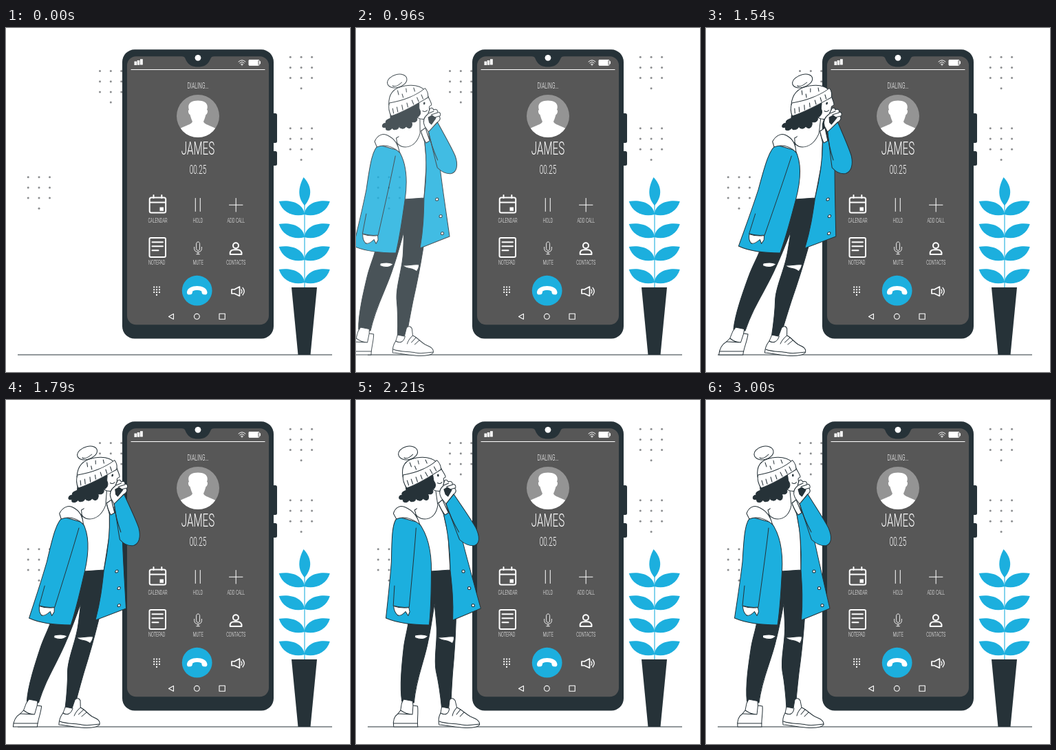
Write an HTML page that moves like this. It is 500x500 px and loops after 3040 ms.

```html
<!DOCTYPE html>
<html lang="en">
<head>
<meta charset="utf-8">
<title>Dialing</title>
<style>
  html, body { margin: 0; width: 100%; height: 100%; overflow: hidden; background: #fff; }
  svg { display: block; width: 100vw; height: 100vh; }
  .dark { fill: #263238; }
  .blue { fill: #1cafde; }
  .white { fill: #fff; }
  .icon { fill: none; stroke: #fff; stroke-width: 1.1; stroke-linecap: round; stroke-linejoin: round; }
  .bold { stroke-width: 2; }
  text { fill: #fff; font: 300 9.9px Roboto, Inter, sans-serif; text-anchor: middle; }
  #woman { stroke: #263238; stroke-width: 1; stroke-linecap: round; stroke-linejoin: round; }
  #woman .line { fill: none; }
  #woman .bare { stroke: none; }
</style>
</head>
<body>
<svg viewBox="0 0 500 500">
  <defs>
    <g id="dots" fill="#8b8d8f">
      <circle r="1.5"/><circle cx="15.8" r="1.5"/><circle cx="31.3" r="1.5"/>
      <circle cy="15.2" r="1.5"/><circle cx="15.8" cy="15.2" r="1.5"/><circle cx="31.3" cy="15.2" r="1.5"/>
      <circle cy="30.4" r="1.5"/><circle cx="15.8" cy="30.4" r="1.5"/><circle cx="31.3" cy="30.4" r="1.5"/>
      <circle cx="15.8" cy="45.6" r="1.5"/>
    </g>
    <path id="leaf" d="M434 271C419 275 402 269 396.700 252C413 249 432 254 434 271Z"/>
    <g id="leaves"><use href="#leaf"/><use href="#leaf" transform="matrix(-1 0 0 1 867.500 0)"/></g>
    <clipPath id="portrait"><circle cx="279" cy="128" r="31"/></clipPath>
  </defs>

  <use href="#dots" x="136.500" y="62.500"/>
  <use href="#dots" x="413.300" y="42.200"/>
  <use href="#dots" x="413.300" y="145.800"/>
  <use href="#dots" x="32.200" y="216.700"/>
  <path d="M17 475H474" stroke="#263238" stroke-width="1.100"/>

  <g id="plant" class="blue">
    <path d="M434 257V377" stroke="#1cafde" stroke-width="1.100"/>
    <path d="M432.500 217C443 228 447 243 434 258C423 246 425 231 432.500 217Z"/>
    <use href="#leaves"/><use href="#leaves" y="33"/><use href="#leaves" y="66"/><use href="#leaves" y="99"/>
    <path class="dark" d="M415 377H452L442.500 475H424.500Z"/>
  </g>

  <g id="phone">
    <g class="dark">
      <rect x="384" y="124" width="10" height="43" rx="2.500"/>
      <rect x="384" y="179" width="10" height="21" rx="2.500"/>
      <rect x="169" y="31.300" width="220" height="420.300" rx="18"/>
    </g>
    <rect x="176" y="41.300" width="206" height="390" rx="13" fill="#575757"/>
    <path class="dark" d="M255 41C261 41 260 45 263 49C266 54 271 56.500 279 56.500S292 54 295 49C298 45 297 41 303 41Z"/>
    <circle class="white" cx="279" cy="43.300" r="4.400"/>
    <path class="icon" d="M182 60.500H376"/>
    <path class="white" d="M186.500 48.500h3.600V54h-3.600ZM190.700 47h3.600V53.700h-3.600ZM195 45.300h3.800V53.600H195ZM353 46.200h13.500V54.500H353ZM368.500 48.300h1.500v4h-1.500Z"/>
    <rect class="icon" x="353" y="46.500" width="15" height="7.700" rx=".8" style="stroke-width:1"/>
    <path class="icon" style="stroke-width:1" d="M338 49Q343 44.500 348 49M339.800 51Q343 48 346.200 51M341.500 52.700Q343 51.500 344.500 52.700"/>
    <circle class="white" cx="343" cy="54" r=".8"/>

    <circle cx="279" cy="128" r="31" fill="#949494"/>
    <g class="white" clip-path="url(#portrait)">
      <path d="M266 119C263 110 269 105.500 279 105.500S295 110 292 119C294 119 293 125 290.500 126C289 131 288 134 287 136C289 142 304 142 311 152V162H247V152C254 142 269 142 271 136C270 134 269 131 267.500 126C265 125 264 119 266 119Z"/>
    </g>

    <g id="labels"></g>

    <g class="icon bold">
      <rect x="208.700" y="246.500" width="23.500" height="22" rx="2.500"/>
      <path d="M209 253.500H232M214.500 243V247M226.300 243V247"/>
      <rect x="208.500" y="305" width="23.500" height="28" rx="2"/>
      <path d="M212.500 311.300H228M212.500 317.300H228M212.500 323.300H221.500"/>
      <circle cx="334" cy="316.300" r="4"/>
      <path d="M325.800 329C325 324 328 322.300 332 322.300H336C340 322.300 343 324 342.500 329Z"/>
      <path d="M328 380H332L339.500 376V389.500L332 386H328Z" stroke-width="1.700"/>
      <path d="M342 380Q343.800 382.700 342 385.500M344 377.500Q348.500 382.700 344 388" stroke-width="1.300"/>
    </g>
    <rect class="white" x="223.500" y="260.500" width="5.500" height="5.300"/>
    <g class="icon">
      <path d="M275.300 247.500V266.500M282.300 247.500V266.500M324.500 257.200H344M334.200 247.500V267" stroke-width="1"/>
      <path d="M276.600 313.500C276.600 310 281.600 310 281.600 313.500V321C281.600 324.300 276.600 324.300 276.600 321ZM273.700 318.500V320.500C273.700 327.500 284.500 327.500 284.500 320.500V318.500M279.100 326V328.700M276.800 328.700H281.400" style="stroke-width:.9"/>
      <path d="M236.500 419.400L243.500 415.500V423.300Z"/>
      <circle cx="277.400" cy="419.300" r="3.900"/>
      <rect x="310" y="415.200" width="8.300" height="8.100"/>
    </g>
    <path d="M215.200 376.600H224M215.200 380.400H224M215.200 384.200H224M219 388H220" fill="none" stroke="#fff" stroke-width="2.300" stroke-linecap="round" stroke-dasharray="0 3.900"/>
    <circle class="blue" cx="277.700" cy="381.700" r="21.900"/>
    <path class="white" d="M263 384C264 372 291.500 372 292.500 384C292.800 386.500 291 387.800 289 387.600L286.500 387.200C284.800 386.800 284.600 384.500 284.200 382.500C280 380.600 275.500 380.600 271.300 382.500C270.900 384.500 270.700 386.800 269 387.200L266.500 387.600C264.500 387.800 262.700 386.500 263 384Z"/>
  </g>

  <g id="woman" opacity="0">
    <g id="legs">
      <path class="dark" d="M108 247H142C146 280 145 303 143 322C141 350 138 375 135 397C133 415 131 435 130 449H117C116 430 114 410 111 394C108 374 116 350 114.500 325C114 312 113.500 305 113 296C109 316 106 333 102 348C95 380 82 402 77 440L59.500 438C57 415 62 383 65.500 360C68 345 72 335 74 322Z"/>
      <path class="white" d="M82.500 342C90 340.500 96 340.500 101.500 343C98 348 90 349 82.500 345.500Z"/>
      <path class="white" d="M115.500 345C123 345.500 131 343 139.500 344C139.500 348 138.500 351 136.500 354C131 348 121 351 115.500 345Z"/>
      <path class="white" d="M59 441L62 435L75 437.500L75.500 444L82 445C83 455 80 466 81 475H46C45 467 47 460 53 456L57 451Z"/>
      <path class="line" d="M46 470H81M53 456L74 457M57 451C64 456 70 457 74 457L75.500 444"/>
      <path class="white" d="M117 446L127 448L129 436C131 432.500 135 433 137 437L139 447C146 450 151 456 158 460C165 463 171 465 171 471C171 475 160 477 150 476.500C138 476 125 473 112 472C111 466 112 460 115 455Z"/>
      <path class="line" d="M112.500 467C122 471 136 470 145 472C154 474 163 472 171 471M115 455C122 459 127 456 128 448M139 447C135 451 133 454 132 459M144 450L138 457M149 454L143 460"/>
    </g>

    <path class="white" d="M90 160L112 146L129 150L137 195L138 247L109.500 249C112 222 104 200 95 178Z"/>
    <path class="white bare" d="M97 140L92 166C99 176 119 176 124 156L127 128Z"/>
    <path class="line" d="M91 166C98 177 119 177 124 153M124 153L122 132"/>

    <g id="coat" class="blue">
      <path d="M126 153L132 149L152 186L158 206C164 235 172 268 180 303L138.500 320C141 292 139.500 270 138 247C139 220 137 190 132 166Z"/>
      <path d="M66 170C56 175 55 203 53 235C49 270 45 293 41.500 317C60 325 81 327 104 327C108 302 109 275 110.500 249C112 222 108 196 95 178Z"/>
      <path d="M136 151L148 137C158 153 172 174 178 186C184 200 182 209 175 211.500C167 213 159 208 153.500 203C148 188 143 171 136 151Z"/>
      <path class="line" d="M136 151C140 165 146 179 153 192M91 186C87 222 81 265 76 301C68 302 60 301 53 299L56 270"/>
    </g>
    <path class="white" d="M53.500 299.500C61 302 69 302.500 75.500 301.500L76.500 308L74 313.500L70.500 307.500C66 312 62 315 58.500 312.500C55 309 53.500 305 53.500 299.500Z"/>
    <path class="white" d="M59 165C62 156 70 152 77 156C88 161 94 170 96.500 181C88 173 75 168 63 173Z"/>
    <path class="white" d="M125 150L131 145L139 164L134 167C130 162 128 158 125 150Z"/>
    <g class="white">
      <circle cx="157" cy="249" r="2.100"/><circle cx="164.500" cy="273.500" r="2.100"/><circle cx="169" cy="298.500" r="2.100"/>
    </g>

    <g id="head">
      <path class="white" d="M115 105L131 99C132.500 103 137 109 137 111.500C137 113 133.500 113 134 115C134.500 118 135 121 133.500 123C134.500 129 131.500 133 126 132.500C120 132 116 130 113 126Z"/>
      <path class="line" d="M120.500 106Q123 102.500 126 103.500M125 120.500Q129 123 131.500 119.500"/>
      <ellipse class="dark" cx="126.300" cy="109.500" rx=".8" ry="1.600"/>
      <path class="dark" d="M78 121C92 126 108 116 115 106C121 108 118 114 120 118C124 124 121 129 117 130C120 136 114 138 110 136C114 145 107 148 103 143C99 149 93 145 93 142C92 149 84 149 83 145C79 151 72 149 74 144C66 147 67 138 73 138C71 133 77 133 79 131Z"/>
      <ellipse class="white" cx="84" cy="77" rx="14.200" ry="9.600" transform="rotate(-14 84 77)"/>
      <path class="line" d="M78 84C83 87 88 82 91 79"/>
      <path class="white" d="M75 112C73 96 79 87 96 84C113 81 124 87 128 94Z"/>
      <path class="line" d="M86 91L88 97M98 88L99 93M109 87L111 92M93 96L95 101"/>
      <path class="white" d="M75.500 109C95 106 114 98 125.500 87.500C129 91 131 97 131 101C118 109 100 121 80 128C76 122 74.500 115 75.500 109Z"/>
      <path class="line" d="M81 117L83 124M87 115L89 122M94 112L96 119M101 109L103 115M108 105L111 111M115 101L118 107M121 97L124 103"/>
    </g>

    <g id="hand">
      <path class="white" d="M136 151L130 143C126 136 127 130 133 125L135 118C136 115 140 116 140.500 119C144 117 147 119 146.500 122C151 122 152.500 126 150 129C153 132 150 136 147 137.500Z"/>
      <path class="dark" d="M134 130L139 127L145 131L139.500 140L136 137Z"/>
      <path class="line" d="M134 124L141 121M138 126L147 123M143 130L150 128"/>
    </g>
  </g>
</svg>
<script>
  const NS = "http://www.w3.org/2000/svg";
  const CONDENSED = 0.57;
  const labels = [
    ["DIALING...", 279, 88, 12.3], ["JAMES", 279, 184, 26.7], ["00.25", 279, 212.3, 17.6],
    ["CALENDAR", 220.5, 283], ["HOLD", 279, 283], ["ADD CALL", 334.3, 283],
    ["NOTEPAD", 219.2, 344.3], ["MUTE", 279.3, 344.3], ["CONTACTS", 334.3, 344.3]
  ];
  for (const [label, x, y, size] of labels) {
    const text = document.createElementNS(NS, "text");
    text.textContent = label;
    text.setAttribute("transform", `translate(${x} ${y}) scale(${CONDENSED} 1)`);
    if (size) text.style.fontSize = size + "px";
    document.getElementById("labels").append(text);
  }

  const LOOP = 3040, FPS = 24, HIDDEN_STEPS = 7, MID_Y = 271.5;
  const stops = [
    { at: 0, skew: 20, x: -250, alpha: 0 },
    { at: 1800, skew: -10, x: 0, alpha: 1 },
    { at: 2400, skew: 2, x: 0, alpha: 1 },
    { at: 3000, skew: 0, x: 0, alpha: 1 }
  ];
  const woman = document.getElementById("woman");
  const tan = deg => Math.tan(deg * Math.PI / 180);
  const mix = (a, b, p) => a + (b - a) * p;
  const bezier = (a, b, s) => 3 * (1 - s) ** 2 * s * a + 3 * (1 - s) * s * s * b + s ** 3;

  // cubic-bezier(.36, -.01, .5, 1.38)
  function ease(p) {
    let low = 0, high = 1;
    for (let i = 0; i < 24; i++) {
      const s = (low + high) / 2;
      if (bezier(0.36, 0.5, s) < p) low = s; else high = s;
    }
    return bezier(-0.01, 1.38, low);
  }

  function pose(ms) {
    const time = Math.min(ms, 2999.99);
    const i = stops.findIndex(stop => stop.at > time);
    const a = stops[i - 1], b = stops[i];
    const p = ease((time - a.at) / (b.at - a.at));
    const k = mix(tan(a.skew), tan(b.skew), p);
    const x = mix(a.x, b.x, p);
    woman.setAttribute("transform", `matrix(1 0 ${k} 1 ${x - k * MID_Y} 0)`);
    woman.setAttribute("opacity", Math.max(0, Math.min(1, mix(a.alpha, b.alpha, p))));
  }

  const start = performance.now();
  function tick() {
    const t = (performance.now() - start) % LOOP;
    const step = Math.floor((t + 2) * FPS / 1000);
    if (step < HIDDEN_STEPS) woman.setAttribute("opacity", 0);
    else pose((step + 0.8) * 1000 / FPS);
    requestAnimationFrame(tick);
  }
  tick();
</script>
</body>
</html>
```
